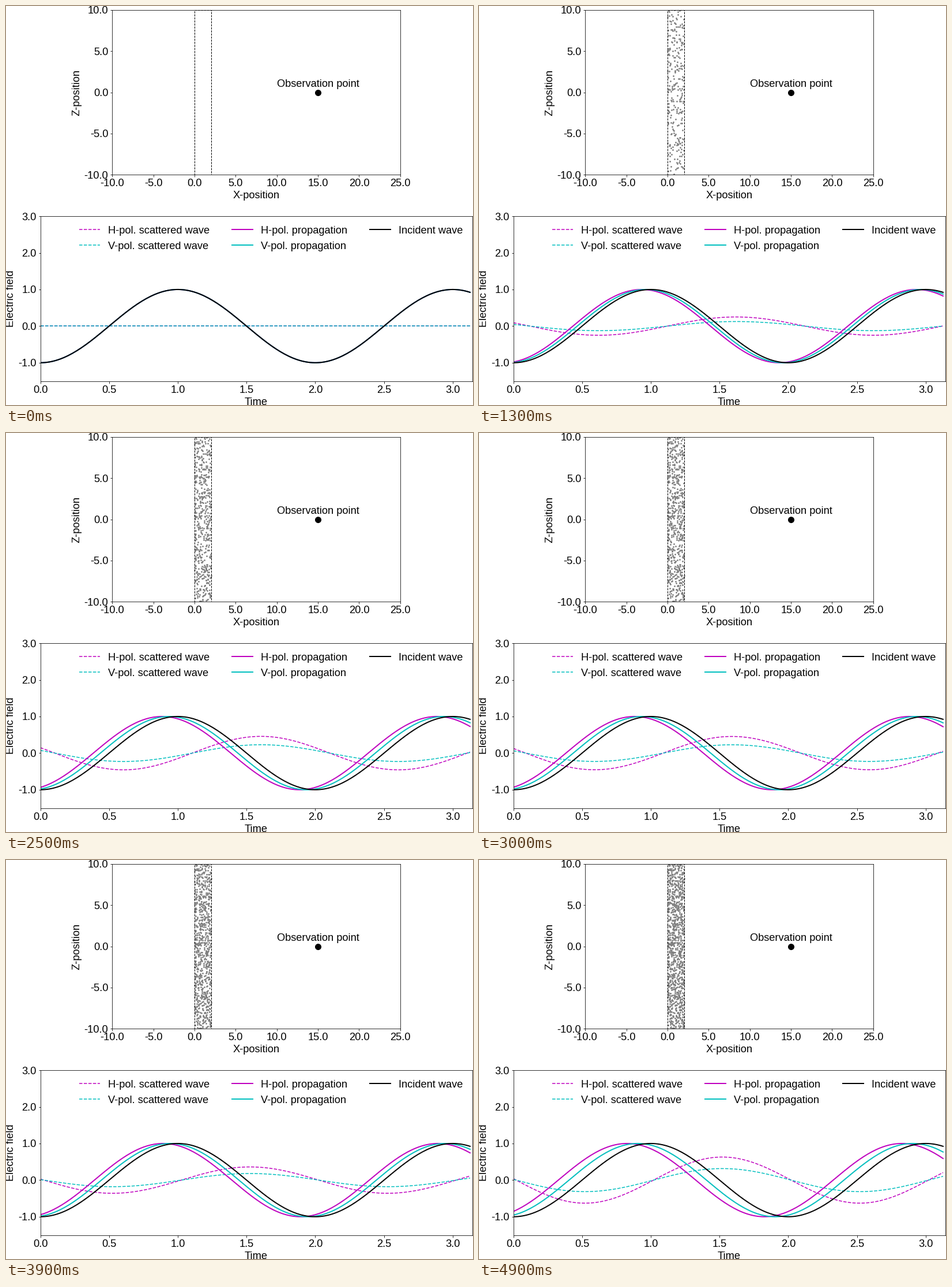
Write a matplotlib script that moves like this. It is 810x691 px and loops after 5 s.

```python
import matplotlib.pyplot as plt
import numpy as np
from matplotlib.animation import FuncAnimation
from matplotlib.patches import Rectangle

W, H, DPI = 810, 691, 72  # at 72 dpi one point is one pixel
FRAMES, INTERVAL = 50, 100
DOTS_PER_FRAME = 20
PANEL_HEIGHT = 285.4

plt.rcParams.update({
    "font.family": "Liberation Sans",
    "font.size": 18.3,
    "axes.linewidth": 0.8,
})

fig = plt.figure(figsize=(W / DPI, H / DPI), dpi=DPI, facecolor="white")


def make_axes(left, top, width, xlim, ylim, xticks, yticks):
    ax = fig.add_axes([left / W, 1 - (top + PANEL_HEIGHT) / H,
                       width / W, PANEL_HEIGHT / H])
    ax.set(xlim=xlim, ylim=ylim)
    ax.set_xticks(xticks, [f"{v:.1f}" for v in xticks])
    ax.set_yticks(yticks, [f"{v:.1f}" for v in yticks])
    return ax


def label(x, y, text, ha="center", rotation=0):
    fig.text(x / W, 1 - y / H, text, ha=ha, va="baseline",
             rotation=rotation, rotation_mode="anchor")


# Scene with the particle slab; both axes share one scale
scene = make_axes(184.35, 6.8, 1.75 * PANEL_HEIGHT, (-10, 25), (-10, 10),
                  np.arange(-10, 26, 5), np.arange(-10, 11, 5))
rng = np.random.default_rng(7)
particles = rng.uniform((0, -10), (2, 10), (DOTS_PER_FRAME * FRAMES, 2))
dots = scene.scatter([], [], s=3, color="gray", linewidths=1)
scene.add_patch(Rectangle((0, -10), 2, 20, fill=False, ls="--", lw=1, zorder=2))
scene.scatter([15], [0], s=100, color="black", linewidths=1)
label(541.2, 139.6, "Observation point")
label(434, 333, "X-position")
label(127, 149.5, "Z-position", rotation=90)

# Field at the observation point
field = make_axes(59.6, 364.1, 749, (0, np.pi), (-1.5, 3),
                  np.arange(0, 3.1, 0.5), np.arange(-1, 3.1, 1))
label(434, 690.6, "Time")
label(13, 507, "Electric field", rotation=90)

t = np.arange(200) * np.pi / 200
STYLES = [
    ("H-pol. scattered wave", "m", "--", 1.5, 127, 387),
    ("V-pol. scattered wave", "c", "--", 1.5, 127, 414),
    ("H-pol. propagation", "m", "-", 2, 392, 387),
    ("V-pol. propagation", "c", "-", 2, 392, 414),
    ("Incident wave", "k", "-", 2, 631, 387),
]
curves = []
for name, color, ls, lw, x, y in STYLES:
    curves.append(field.plot(t, 0 * t, color=color, ls=ls, lw=lw)[0])
    fig.add_artist(plt.Line2D([x / W, (x + 36) / W], [1 - y / H] * 2,
                              color=color, ls=ls, lw=lw))
    label(x + 50.4, y + 6.6, name, ha="left")

# Strength and peak time of the scattered wave as the slab fills up
KEY_FRAMES = [0, 8, 13, 20, 30, 39, 49]
KEY_AMPS = [0, 0.11, 0.25, 0.46, 0.455, 0.36, 0.63]
KEY_PEAKS = [1.62, 1.62, 1.62, 1.62, 1.59, 1.525, 1.52]


def wave(phasor):
    return (phasor * np.exp(1j * np.pi * t)).real


def update(frame):
    amp = np.interp(frame, KEY_FRAMES, KEY_AMPS)
    peak = np.interp(frame, KEY_FRAMES, KEY_PEAKS)
    incident = -1
    scattered = [a * np.exp(-1j * np.pi * peak) for a in (amp, amp / 2)]
    # The transmitted wave keeps unit amplitude; only its phase shifts
    passed = [(incident - s) / abs(incident - s) for s in scattered]
    for curve, phasor in zip(curves, [*scattered, *passed, incident]):
        curve.set_ydata(wave(phasor))
    dots.set_offsets(particles[:DOTS_PER_FRAME * frame])
    return [dots, *curves]


anim = FuncAnimation(fig, update, frames=FRAMES, interval=INTERVAL,
                     repeat=True, repeat_delay=0, blit=False)
plt.show()
```
